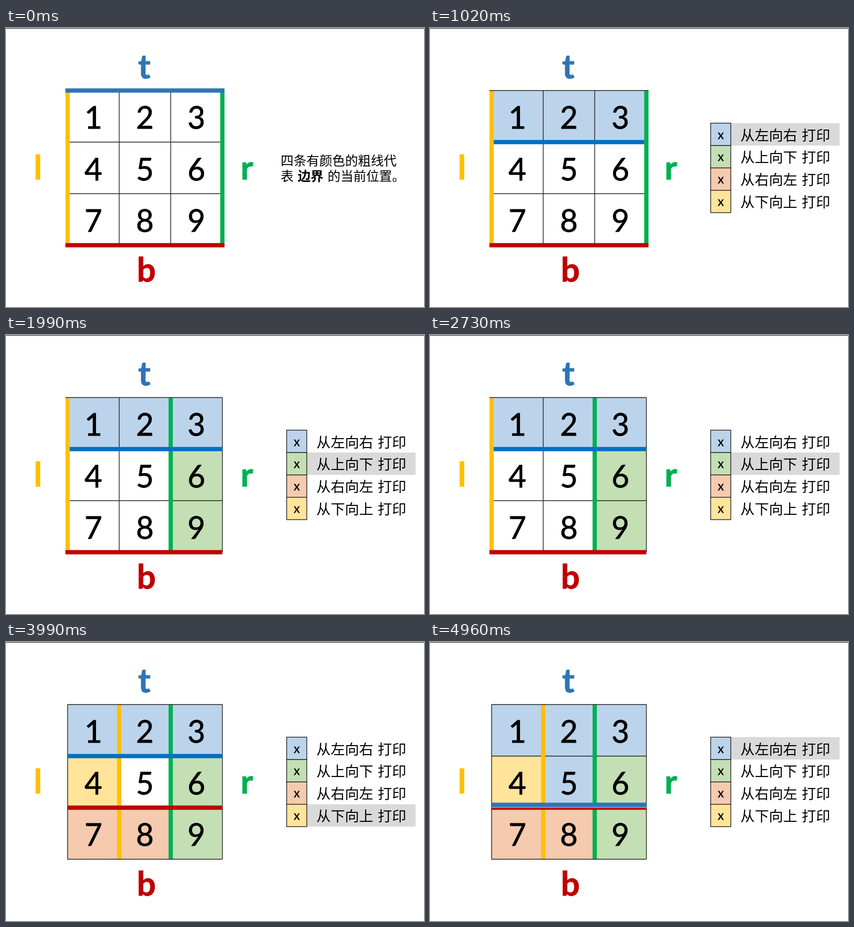
Recreate the animation shown at these times as an HTML page. Size 840 by 560 pixels, loop 5000 ms.

```html
<!DOCTYPE html>
<html lang="zh-CN">
<head>
<meta charset="utf-8">
<style>
html, body { margin: 0; width: 100%; height: 100%; overflow: hidden; background: #fff; }
svg { display: block; width: 840px; height: 560px; }
text { font-family: Lato, Carlito, sans-serif; }
.mid { text-anchor: middle; }
.digit { font-size: 61.5px; stroke: #000; stroke-width: .9; }
.edge { font-size: 67px; font-weight: 700; stroke: currentColor; stroke-width: 1; fill: currentColor; }
.mark { font-size: 24.5px; stroke: #000; stroke-width: .4; }
.cjk { font-family: "Noto Sans CJK SC", "Noto Sans CJK", sans-serif; font-weight: 350; word-spacing: 2.5px; }
</style>
</head>
<body>
<svg id="stage" viewBox="0 0 840 560"></svg>
<script>
const CUTS = [1020, 1990, 2970, 3990, 4960], LOOP = 5000;
const X = [123.8, 227.5, 331, 434.8], Y = [125.5, 229, 332.5, 436], HALF = 4.3;
const FILLS = ['#bcd4eb', '#c4dfb4', '#f6caae', '#ffe499'];
const FILLED_AT = '111452332'; // step at which each cell 1..9 is coloured
const GREEN = '#00b050', YELLOW = '#ffc000', RED = '#c00000', BLUE = '#2e75b6', STRONG_BLUE = '#0070c0';
const LEGEND = ['从左向右 打印', '从上向下 打印', '从右向左 打印', '从下向上 打印'];

const box = (x0, y0, x1, y1, fill, extra = '') =>
  `<rect x="${x0}" y="${y0}" width="${x1 - x0}" height="${y1 - y0}" fill="${fill}" ${extra}/>`;
const text = (x, y, cls, body, extra = '') =>
  `<text x="${x}" y="${y}" class="${cls}" ${extra}>${body}</text>`;
const line = (x0, y0, x1, y1) =>
  `<path d="M${x0} ${y0}L${x1} ${y1}" stroke="#1a1a1a" stroke-width="1.4"/>`;

function grid(step) {
  const top = step < 1 ? 0 : step < 5 ? 1 : 2, bottom = step < 3 ? 3 : 2;
  const left = step < 4 ? 0 : 1, right = step < 2 ? 3 : 2;
  // Horizontal extent: outer lines cover the side bars, inner ones stop at them.
  const span = row => {
    const d = row % 3 ? HALF : -HALF;
    return [left ? X[0] : X[0] + d, right < 3 ? X[3] : X[3] - d];
  };
  const across = (row, fill, y0 = Y[row] - HALF, y1 = Y[row] + HALF) => {
    const [a, b] = span(row);
    return box(a, y0, b, y1, fill);
  };
  const down = (col, fill) => box(X[col] - HALF, Y[0], X[col] + HALF, Y[3], fill);

  let out = '';
  [...FILLED_AT].forEach((at, i) => {
    const c = i % 3, r = (i - c) / 3;
    if (step >= at) out += box(X[c], Y[r], X[c + 1], Y[r + 1], FILLS[(at - 1) % 4]);
  });
  for (const x of X) out += line(x, Y[0], x, Y[3]);
  for (const y of [Y[1], Y[2]]) out += line(X[0], y, X[3], y);
  out += down(left, YELLOW) + down(right, GREEN);
  for (const row of [0, 3]) {
    const [a, b] = span(row);
    out += line(a, Y[row], b, Y[row]);
  }
  out += across(bottom, RED);
  if (top === bottom) {
    out += across(top, '#e8dce4', 331, 332.4) + across(top, BLUE, 322.5, 331.4);
  } else {
    out += across(top, step ? STRONG_BLUE : BLUE);
  }
  for (let i = 0; i < 9; i++) {
    const c = i % 3, r = (i - c) / 3;
    out += text(175.5 + 103.5 * c, 202.4 + 103.2 * r, 'mid digit', i + 1);
  }
  return out;
}

function legend(step) {
  const active = (step - 1) % 4;
  return LEGEND.map((label, i) => {
    const y = 191 + 44.9 * i;
    return (i === active ? box(605, y, 823, y + 44.9, '#d9d9d9') : '') +
      box(564, y, 604.5, y + 44.9, FILLS[i], 'stroke="#1a1a1a" stroke-width="1.4"') +
      text(584.3, y + 31.5, 'mid mark', 'x') +
      text(623.8, y + 34.5, 'cjk', label, 'font-size="28.6"');
  }).join('');
}

const note = () =>
  text(552, 275.5, 'cjk', '四条有颜色的粗线代', 'font-size="25.9"') +
  text(552, 306.5, 'cjk', '表 <tspan font-weight="700">边界</tspan> 的当前位置。', 'font-size="25.9"');

const labels = [[278, 101, 't', BLUE], [282, 509, 'b', RED], [64, 304, 'l', YELLOW], [484, 304, 'r', GREEN]]
  .map(([x, y, name, color]) => text(x, y, 'mid edge', name, `color="${color}"`)).join('');

const stage = document.getElementById('stage');
let shown = -1;
function frame() {
  const t = performance.now() % LOOP;
  const step = CUTS.filter(cut => t >= cut).length;
  if (step !== shown) {
    shown = step;
    stage.innerHTML = box(0, 0, 840, 1, '#000') + labels + grid(step) + (step ? legend(step) : note());
  }
  requestAnimationFrame(frame);
}
frame();
</script>
</body>
</html>
```
